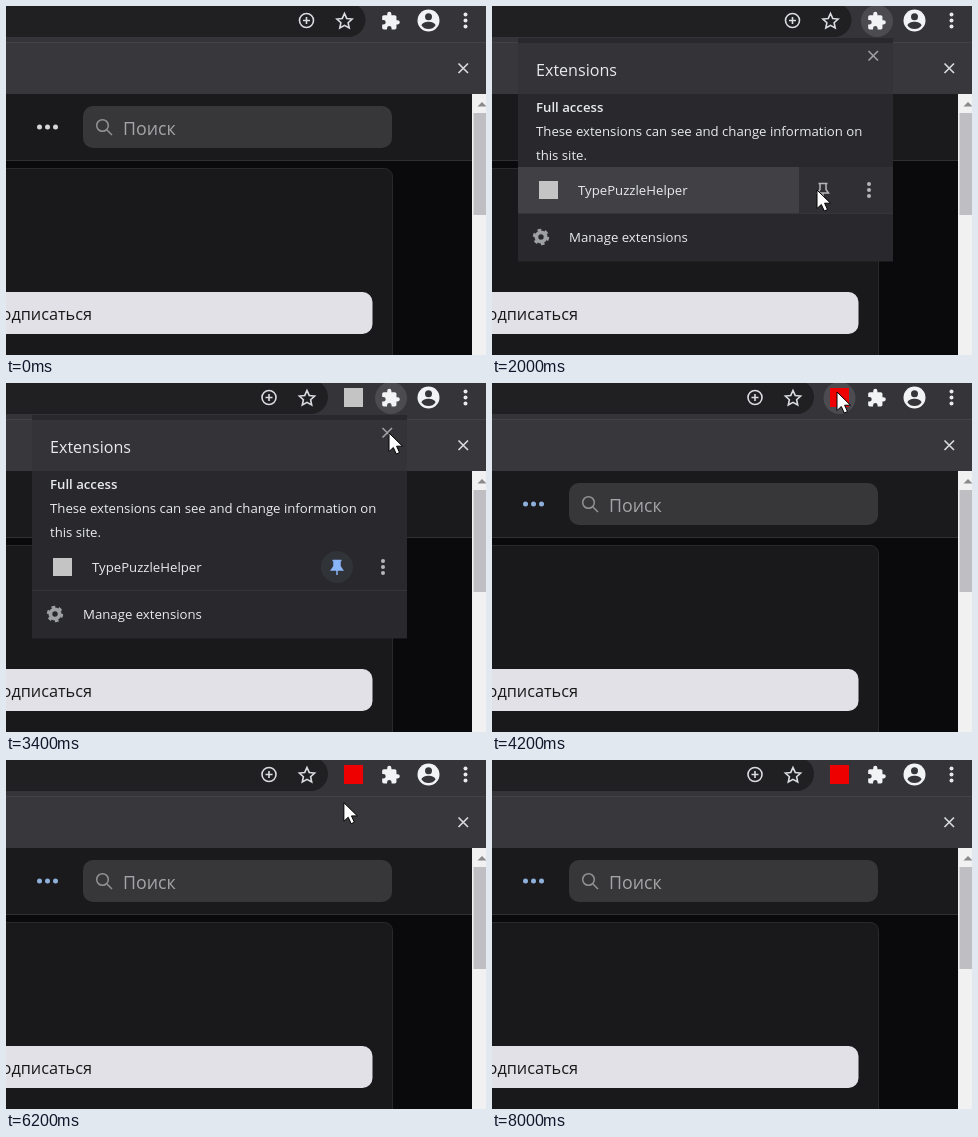
Animation, 480 px wide and 349 px high, one loop 8.2 s. Source, as an HTML page:

```html
<!DOCTYPE html>
<html lang="ru">
<head>
<meta charset="utf-8">
<style>
html, body { margin: 0; width: 100%; height: 100%; overflow: hidden; background: #0a0a0b; }
svg { display: block; width: 480px; height: 349px; }
text { font-family: "Open Sans", "Noto Sans", sans-serif; font-size: 13.2px; fill: #e8eaed; }
.line { fill: none; stroke: #dadce0; stroke-width: 1.6; }
</style>
</head>
<body>
<svg viewBox="0 0 480 349">
  <defs>
    <g id="dots"><circle cy="-6" r="2"/><circle r="2"/><circle cy="6" r="2"/></g>
  </defs>

  <!-- page -->
  <rect width="480" height="349" fill="#0a0a0c"/>
  <rect y="88" width="466" height="66" fill="#1a1a1c"/>
  <path d="M0 154.5H466" stroke="#303032"/>
  <rect x="-20" y="162.5" width="406.500" height="210" rx="8" fill="#19191b" stroke="#29292b"/>
  <g id="more"><circle cx="33.500" cy="121" r="2.500"/><circle cx="41.500" cy="121" r="2.500"/><circle cx="49.500" cy="121" r="2.500"/></g>
  <rect x="77" y="100" width="309" height="42" rx="10" fill="#37373a"/>
  <g fill="none" stroke="#929295" stroke-width="1.500"><circle cx="96.500" cy="119.500" r="5.800"/><path d="M101 124l5 5"/></g>
  <text x="117" y="128.500" style="font-size:17.800px;fill:#a5a5a8">Поиск</text>
  <rect x="-20" y="286" width="386.500" height="42" rx="10" fill="#e2e1e7"/>
  <text x="86" y="314" text-anchor="end" style="font-size:16.300px;font-weight:500;fill:#19191a">Подписаться</text>

  <!-- scrollbar -->
  <rect x="466" y="88" width="14" height="261" fill="#f1f1f2"/>
  <rect x="467.500" y="107" width="12.500" height="102" fill="#bfbfc3"/>
  <path d="M471.500 100.500l4.500-4.500 4.500 4.500z" fill="#8a8a8d"/>

  <!-- browser bars -->
  <rect width="480" height="37" fill="#353539"/>
  <rect y="36" width="480" height="52" fill="#38383c"/>
  <path d="M0 36.500H480" stroke="#434347"/>
  <path d="M452.500 57.500l9.500 9.500m0-9.500l-9.500 9.500" class="line"/>
  <g id="address">
    <rect x="-60" y="-3" width="419.500" height="34" rx="17" fill="#202023"/>
    <circle cx="300.500" cy="14.500" r="7" class="line"/>
    <path d="M300.500 11v7M297 14.500h7" class="line"/>
    <path id="star" class="line"/>
  </g>
  <circle id="glow" cy="15" r="16" fill="#4b4b50"/>
  <rect id="badge" x="338" y="5" width="19" height="19"/>
  <path fill="#f1f3f4" transform="translate(374.500 5) scale(.84)" d="M20.500 11H19V7c0-1.100-.9-2-2-2h-4V3.500a2.500 2.500 0 0 0-5 0V5H4c-1.100 0-2 .9-2 2v3.800h1.500a2.700 2.700 0 0 1 0 5.400H2V20c0 1.100.9 2 2 2h3.800v-1.500a2.700 2.700 0 0 1 5.400 0V22H17c1.100 0 2-.9 2-2v-4h1.500a2.500 2.500 0 0 0 0-5z"/>
  <circle cx="422.500" cy="14.500" r="11" fill="#f1f3f4"/>
  <g fill="#35353a"><circle cx="422.500" cy="10.700" r="3.500"/><path d="M415.500 19.500c1-5 13-5 14 0q-2.500 3.500-7 3.500t-7-3.500z"/></g>
  <use href="#dots" x="459.500" y="14.500" fill="#e8eaed"/>

  <!-- extensions popup -->
  <g id="popup">
    <rect x="26" y="32" width="375" height="223.500" fill="#29292d"/>
    <rect x="26" y="37" width="375" height="51" fill="#343438"/>
    <path d="M376.500 45l9.500 9.500m0-9.500l-9.500 9.500" class="line" style="stroke:#a0a1a5"/>
    <text x="44" y="69.500" style="font-size:16.100px">Extensions</text>
    <text x="44" y="106" style="font-weight:600">Full access</text>
    <text x="44" y="130">These extensions can see and change information on</text>
    <text x="44" y="153.500">this site.</text>
    <g id="row">
      <rect x="26" y="161" width="375" height="46" fill="#303034"/>
      <rect x="26" y="161" width="281" height="46" fill="#414145"/>
    </g>
    <path d="M26 207.500H401" stroke="#36363a"/>
    <rect x="47" y="175" width="19" height="18" fill="#c4c4c5"/>
    <text x="86" y="188.500">TypePuzzleHelper</text>
    <circle id="halo" cx="331" cy="184" r="16" fill="#303338"/>
    <path id="pin" d="M326.500 177.500h9m-7.500 0v6l-2.500 3.500h11l-2.500-3.500v-6M331 187v5" stroke-width="1.500"/>
    <use href="#dots" x="377" y="184" fill="#b5b6ba"/>
    <g fill="none" stroke="#9fa0a4"><circle cx="49" cy="231" r="4.600" stroke-width="3.800"/><circle cx="49" cy="231" r="7" stroke-width="2.400" stroke-dasharray="3.660 3.670"/></g>
    <text x="77" y="236">Manage extensions</text>
  </g>

  <g id="cursor" stroke="#000" stroke-linejoin="round" fill="#fff">
    <path id="arrow" d="M0 0V18.500L4.300 14.500 7.300 21 10.500 19.500 7.600 13.200H13.500z"/>
    <path id="hand" d="M-2 2Q-2-.5 0-.5T2 2V9Q5 7 6 9.500 9 8 9.500 10.500 12.500 10 12 13 12 19 9 23H0Q-3 18-8 13-7 10-4 12L-2 14z"/>
  </g>
</svg>
<script>
const LOOP = 8200, STEP = 200;
const OPEN = 1000, PINNED = 2400, CLOSE = 3800, ACTIVE = 4000;
// Pointer path: time, x, y
const track = [
  [400, 425, 82], [800, 386, 15], [1200, 386, 16], [1800, 325, 184],
  [2800, 325, 184], [3400, 383, 50], [3600, 383, 50], [4200, 345, 9],
  [5000, 345, 9], [5400, 349, 14], [6000, 349, 14], [7000, 242, 290], [7600, 242, 290]
];
const el = id => document.getElementById(id);
const show = (id, on) => el(id).style.display = on ? '' : 'none';
const paint = (id, color) => el(id).setAttribute('fill', color);

el('star').setAttribute('d', 'M' + Array.from({ length: 10 }, (_, i) => {
  const r = i % 2 ? 3.8 : 8, a = i * Math.PI / 5;
  return (338.5 + r * Math.sin(a)).toFixed(2) + ' ' + (15.5 - r * Math.cos(a)).toFixed(2);
}).join('L') + 'Z');

function pointer(t) {
  let i = track.findIndex(p => p[0] > t);
  if (i < 0) i = track.length - 1;
  if (!i) i = 1;
  const [t0, x0, y0] = track[i - 1], [t1, x1, y1] = track[i];
  const k = Math.min(1, Math.max(0, (t - t0) / (t1 - t0)));
  const e = k * k * (3 - 2 * k);
  return [x0 + (x1 - x0) * e, y0 + (y1 - y0) * e];
}

function draw(t) {
  const open = t >= OPEN && t < CLOSE, pinned = t >= PINNED;
  const [x, y] = pointer(t);
  const overBadge = t >= ACTIVE && y < 32;

  show('popup', open);
  show('row', t >= 1600 && t < 3200);
  show('halo', pinned);
  paint('pin', pinned ? '#8ab4f8' : 'none');
  el('pin').setAttribute('stroke', pinned ? '#8ab4f8' : '#b5b6ba');

  el('address').setAttribute('transform', `translate(${pinned ? -37.5 : 0} 0)`);
  show('badge', pinned);
  paint('badge', t < ACTIVE ? '#c4c4c5' : '#ee0000');
  paint('more', t < CLOSE ? '#d6d6d9' : '#8fb0da');
  show('glow', open || overBadge || (t >= 800 && t < OPEN));
  el('glow').setAttribute('cx', overBadge ? 347.5 : 385);

  const overButton = y > 285;
  show('cursor', t >= track[0][0] && t <= 7600);
  show('arrow', !overButton);
  show('hand', overButton);
  el('cursor').setAttribute('transform', `translate(${x} ${y})`);
}

const start = performance.now();
function tick() {
  const t = (performance.now() - start) % LOOP;
  draw(Math.floor(t / STEP) * STEP);
  requestAnimationFrame(tick);
}
tick();
</script>
</body>
</html>
```
